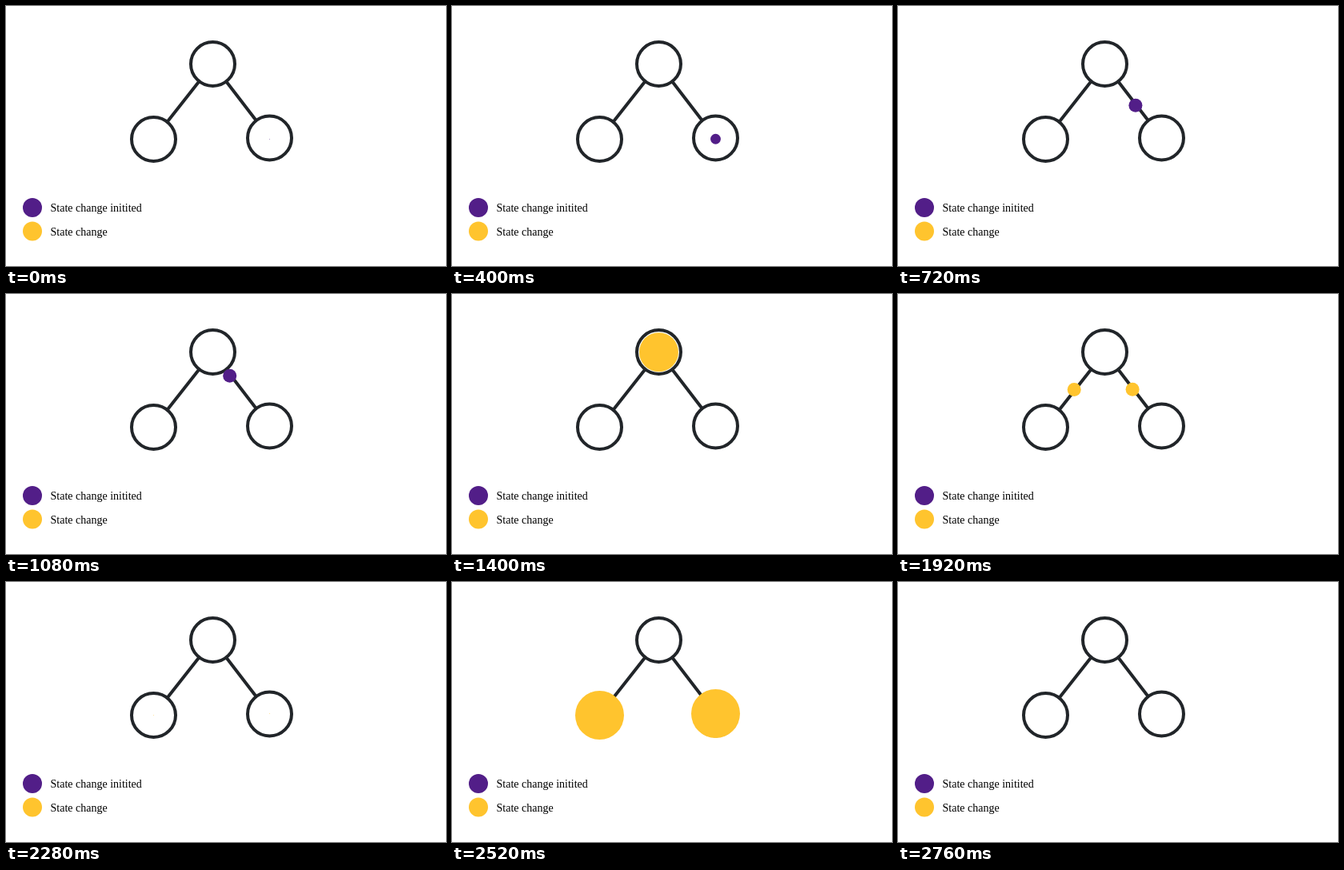
These frames come from a looping animation (550x325 px, 3.48 s). An HTML page with a canvas:

```html
<!DOCTYPE html>
<html lang="en">
<head>
<meta charset="utf-8">
<title>State change</title>
<style>
  html, body { margin: 0; width: 100%; height: 100%; overflow: hidden; background: #fff; }
  canvas { display: block; }
</style>
</head>
<body>
<canvas id="stage" width="550" height="325"></canvas>
<script>
const ctx = document.getElementById('stage').getContext('2d');
const INK = '#212529', PURPLE = '#521e88', YELLOW = '#ffc42e';
const LOOP = 3480, STEP = 40;
const PEAK = 6, PULSE_END = 11;
const TINY = 0.4, FULL = 30.5, DOT = 8.5;

const parent = [258.5, 72.5];
const left = [184.5, 166.5];
const right = [329.5, 165];

const mix = (a, b, k) => a + (b - a) * k;

function disc([x, y], r, color) {
  ctx.fillStyle = color;
  ctx.beginPath();
  ctx.arc(x, y, r, 0, Math.PI * 2);
  ctx.fill();
}

function edge(a, b) {
  ctx.beginPath();
  ctx.moveTo(...a);
  ctx.lineTo(...b);
  ctx.stroke();
}

function node(center) {
  disc(center, 27.5, '#fff');
  ctx.stroke();
}

function legend(y, baseline, color, label) {
  disc([33, y], 12, color);
  ctx.fillStyle = '#000';
  ctx.fillText(label, 55.5, baseline);
}

// Grows to full size, then shrinks back slightly faster.
function pulse(tick, start, [x, y], color, drift = 0) {
  const n = tick - start;
  if (n < 0 || n > PULSE_END) return;
  const k = n <= PEAK ? n / PEAK : (PULSE_END - n) / (PULSE_END - PEAK);
  disc([x, y + drift * (1 - k)], mix(TINY, FULL, k), color);
}

function travel(tick, start, end, from, to, color) {
  if (tick < start || tick > end) return;
  const k = (tick - start) / (end - start);
  disc([mix(from[0], to[0], k), mix(from[1], to[1], k)], DOT, color);
}

function draw(time) {
  const tick = Math.floor((time % LOOP) / STEP);
  ctx.fillStyle = '#fff';
  ctx.fillRect(0, 0, 550, 325);

  ctx.strokeStyle = INK;
  ctx.lineWidth = 4;
  edge(parent, left);
  edge(parent, right);
  [parent, left, right].forEach(node);

  ctx.font = '14px "Liberation Serif", "Times New Roman", serif';
  legend(252, 257, PURPLE, 'State change initited');
  legend(281.5, 287, YELLOW, 'State change');

  pulse(tick, 0, [329.5, 165.3], PURPLE, 1.2);
  travel(tick, 12, 27, [308.4, 138.9], [279.7, 102.3], PURPLE);
  pulse(tick, 28, parent, YELLOW, 0.8);
  travel(tick, 40, 56, [236.8, 99.5], [203.6, 139.4], YELLOW);
  travel(tick, 40, 56, [277.7, 99.6], [308.5, 138.9], YELLOW);
  pulse(tick, 57, left, YELLOW);
  pulse(tick, 57, [329.5, 164.5], YELLOW);
}

let origin;
function loop(now) {
  origin ??= now;
  draw(now - origin);
  requestAnimationFrame(loop);
}
draw(0);
requestAnimationFrame(loop);
</script>
</body>
</html>
```
